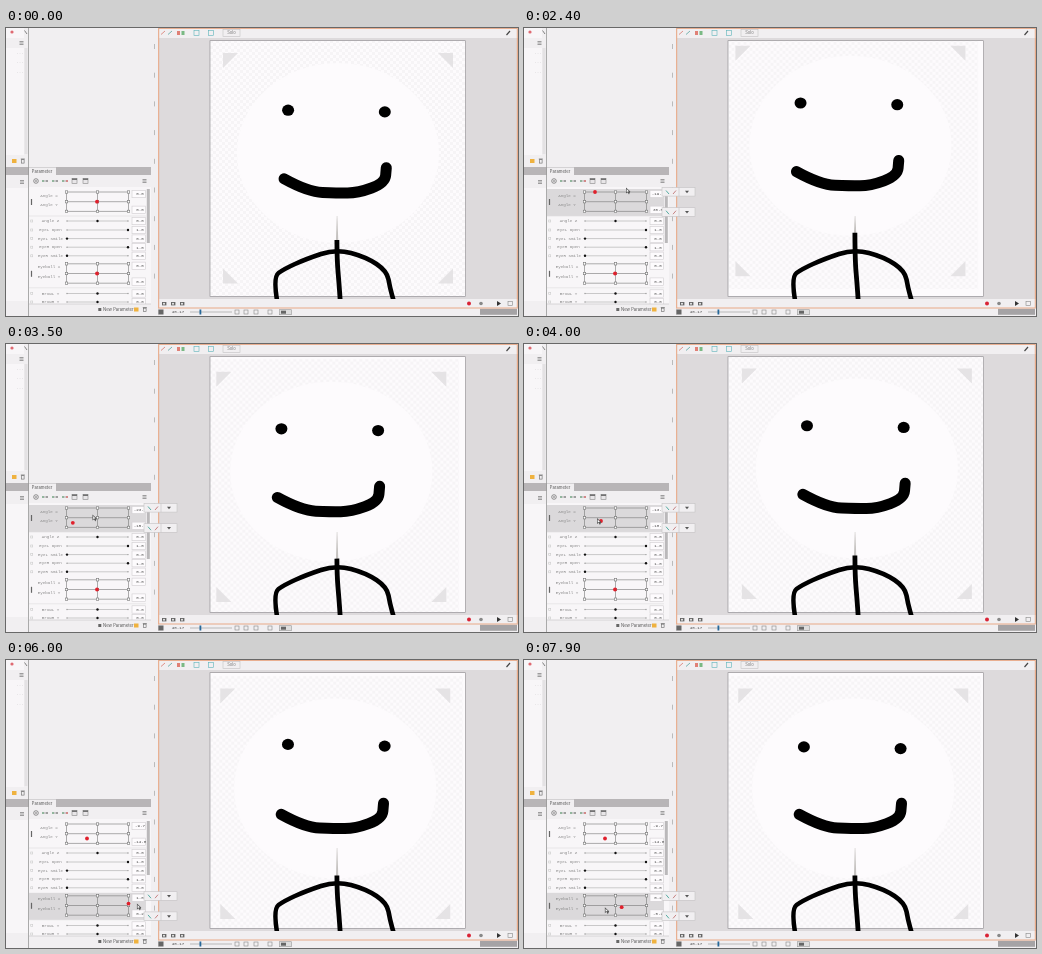
These frames come from a looping animation (512 by 288 pixels, 8 s). An HTML page with a canvas:

```html
<!DOCTYPE html>
<html>
<head>
<meta charset="utf-8">
<style>
html, body { margin: 0; width: 100%; height: 100%; overflow: hidden; background: #dddadc; }
canvas { display: block; }
</style>
</head>
<body>
<canvas id="stage" width="512" height="288"></canvas>
<script>
const c = document.getElementById('stage').getContext('2d');
const LOOP = 8000, GRAB_ANGLE = 1550, GRAB_EYES = 5300;
const MONO = '"Liberation Mono", monospace', SANS = 'Inter, sans-serif';
const PAPER = '#fdfbfd', PANEL = '#f1eff1', EDGE = '#c4c2c4', INK = '#666';
const { sin, cos, PI } = Math;

const clamp = (v, a, b) => Math.min(b, Math.max(a, v));
const ramp = (t, a, b) => { const u = clamp((t - a) / (b - a), 0, 1); return u * u * (3 - 2 * u); };
const mix = (a, b, u) => a.map((v, i) => v + (b[i] - v) * u);

// Key points of the first drag: [ms, x, y]
const dragKeys = [[1500, 91, 173.7], [2400, 71, 164], [3000, 76, 164], [3400, 66, 179], [4000, 77, 177], [5150, 81, 178.5]];
const pointerKeys = [[900, 132, 212], [1400, 95, 174], [2400, 102, 159.5], [3000, 100, 167], [4000, 73, 174], [5150, 81, 178.5]];

function follow(keys, t) {
  return keys.slice(1).reduce((p, k, i) => mix(p, k.slice(1), ramp(t, keys[i][0], k[0])), keys[0].slice(1));
}

// The head follows the pad, with a sway that lags behind the drag
function headAt(t, [x, y]) {
  const u = clamp((t - 2400) / 2200, 0, 1);
  return [(x - 91) / 31 * 8.6 - 4.8 * sin(2 * PI * u), (y - 173.7) / 9.7 * 7.2 - 38 * u ** 4 * (1 - u)];
}

// Sweeping drag across the eyeball pad
function sweep(t, reach, lead) {
  const phase = 2 * PI * (t - 6000) / 1560, gain = ramp(t, GRAB_EYES, 5700);
  return [91 + reach * gain * cos(phase + lead), 245.5 + 6 * gain * sin(2.06 * phase - .34)];
}

function pose(t) {
  const angle = follow(dragKeys, t);
  const [x, y] = sweep(t, 34, 0);
  return {
    angle, head: headAt(t, angle), eye: [clamp(x, 60.5, 122.5), y],
    pointer: mix(follow(pointerKeys, t), sweep(t, 44, .43), ramp(t, 5150, 5350))
  };
}

function box(x, y, w, h, fill, stroke) {
  if (fill) { c.fillStyle = fill; c.fillRect(x, y, w, h); }
  if (stroke) { c.strokeStyle = stroke; c.lineWidth = .6; c.strokeRect(x, y, w, h); }
}
function trace(p) {
  c.beginPath();
  for (let i = 0; i < p.length; i += 2) c.lineTo(p[i], p[i + 1]);
}
function line(color, width, ...p) {
  c.strokeStyle = color; c.lineWidth = width;
  trace(p); c.stroke();
}
function poly(fill, ...p) {
  c.fillStyle = fill;
  trace(p); c.closePath(); c.fill();
}
function dot(x, y, rx, fill, ry = rx) {
  c.fillStyle = fill;
  c.beginPath(); c.ellipse(x, y, rx, ry, 0, 0, 7); c.fill();
}
// Smooth stroke through points
function brush(width, ...p) {
  c.lineWidth = width; c.strokeStyle = '#000';
  c.beginPath(); c.moveTo(p[0], p[1]);
  let i = 2;
  for (; i < p.length - 2; i += 2) c.quadraticCurveTo(p[i], p[i + 1], (p[i] + p[i + 2]) / 2, (p[i + 1] + p[i + 3]) / 2);
  c.lineTo(p[i], p[i + 1]); c.stroke();
}
function text(s, x, y, color = '#888', font = MONO, align = 'center') {
  c.font = '4.2px ' + font;
  c.textAlign = align; c.textBaseline = 'middle'; c.fillStyle = color;
  c.fillText(s, x, y);
}
function menu(x, y) {
  for (let i = -1; i < 2; i++) line(INK, .6, x - 2, y + i * 1.5, x + 2, y + i * 1.5);
}
function files(x, y) {
  box(x - 2, y - 2, 4.5, 4, '#efb23f');
  box(x + 7.5, y - 1.3, 2.6, 3.4, null, INK);
  line(INK, .7, x + 6.8, y - 2, x + 10.8, y - 2);
}

const tile = document.createElement('canvas');
tile.width = tile.height = 6;
const tc = tile.getContext('2d');
tc.fillStyle = '#f6f4f6';
tc.fillRect(0, 0, 3, 3); tc.fillRect(3, 3, 3, 3);
const checker = c.createPattern(tile, 'repeat');

function sidePanels() {
  box(0, 0, 146, 288, PANEL);
  box(0, 0, 18, 127, '#f8f6f8');
  box(0, 10, 18, 10, PANEL);
  dot(6, 4, 1.6, '#df6a72');
  line(INK, .8, 18.5, 2.5, 21, 6);
  menu(15.5, 15);
  for (const y of [25, 34, 44]) text('...', 14, y, '#bbb');
  box(18.5, 20, 3, 106, '#e4e2e4');
  files(8, 133);
  box(0, 139, 145, 8, '#b8b5b7');
  menu(16, 154);
  box(0, 160, 22, 113, '#f8f6f8');
  line('#999', .8, 22.5, 0, 22.5, 288);
}

function value(s, y) {
  box(126, y - 3.7, 13.5, 7.4, '#fdfbfd', '#d0ced0');
  text(s, 134, y + .2, '#444');
}

function popups(y) {
  for (const top of [y, y + 20.2]) {
    box(138, top, 33, 8.6, PANEL, EDGE);
    line('#45a59a', .9, 142, top + 3, 145, top + 6.5);
    line('#b66', .8, 149, top + 6.5, 152, top + 3);
    line(EDGE, .6, 155, top, 155, top + 8.6);
    poly('#555', 161, top + 3.3, 165, top + 3.3, 163, top + 5.8);
  }
}

// Two-axis parameter pad whose top edge is y
function pad(name, y, [px, py], range, active) {
  if (active) box(23, y - 3, 117, 27, '#dbd9db');
  line('#dddbdd', .6, 23, y + 24, 140, y + 24);
  text(name + ' X', 43, y + 3.5);
  text(name + ' Y', 43, y + 13.3);
  line(INK, 1.2, 25.5, y + 7, 25.5, y + 13);
  for (let i = 0; i < 3; i++) {
    line('#777', .6, 60.5 + 31 * i, y, 60.5 + 31 * i, y + 19.4);
    line('#777', .6, 60.5, y + 9.7 * i, 122.5, y + 9.7 * i);
  }
  for (let i = 0; i < 9; i++)
    box(59.3 + 31 * (i % 3), y - 1.2 + 9.7 * Math.floor(i / 3), 2.4, 2.4, '#fff', '#777');
  dot(px, py, 1.9, '#e0202c');
  value(((px - 91) / 31 * range).toFixed(1), y + 2);
  value(((y + 9.7 - py) / 9.7 * range).toFixed(1), y + 17.8);
}

function slider(name, y, pos) {
  box(24.7, y - 1, 2, 2, null, '#ccc');
  line('#aaa', .6, 61, y, 122, y);
  dot(61, y, .7, '#999'); dot(122, y, .7, '#999');
  dot(61 + 61 * pos, y, 1.2, '#111');
  text(name, 44.5, y);
  value(pos === 1 ? '1.0' : '0.0', y);
}

function parameters(t, { angle, eye }) {
  box(23, 139.5, 27, 8, PANEL);
  text('Parameter', 36, 143.4, '#555', SANS);
  c.strokeStyle = INK; c.lineWidth = .7;
  c.beginPath(); c.arc(30, 153, 2.3, 0, 7); c.stroke();
  dot(30, 153, .8, INK);
  for (const x of [39, 49, 59]) {
    line('#777', .6, x - 3, 153, x + 3, 153);
    dot(x - 2, 153, .8, '#4a9b62'); dot(x + 2, 153, .8, x > 55 ? '#d33' : INK);
  }
  for (const x of [66, 77]) { box(x, 150.5, 5, 5, '#e8e6e8', '#888'); box(x, 150.5, 5, 1.4, INK); }
  menu(138.5, 153);
  box(23, 159, 122, 117, '#f8f6f8');
  box(140.8, 161, 3, 54, '#bab8ba');
  const anglesOn = t >= GRAB_ANGLE && t < 5200, eyesOn = t >= GRAB_EYES;
  pad('Angle', 164, angle, 30, anglesOn);
  pad('Eyeball', 235.8, eye, 1, eyesOn);
  slider('Angle Z', 193, .5);
  ['EyeL Open', 'EyeL Smile', 'EyeR Open', 'EyeR Smile'].forEach((s, i) => slider(s, 202 + 8.6 * i, 1 - i % 2));
  slider('BrowL Y', 265.5, .5);
  slider('BrowR Y', 274, .5);
  box(23, 276, 122, 12, PANEL);
  line(EDGE, .6, 23, 276, 145, 276);
  box(92.3, 280, 3, 3, INK);
  text('New Parameter', 97, 281.8, '#555', SANS, 'left');
  files(130, 281.5);
  if (anglesOn) popups(159.5);
  if (eyesOn) popups(231.7);
}

function viewFrame() {
  box(145, 0, 7.5, 288, PANEL);
  line(EDGE, .8, 145.2, 0, 145.2, 288);
  for (let y = 18; y < 275; y += 28.7) line('#bbb', 1, 148.5, y - 2, 148.5, y + 3);
  box(153, 0, 359, 10, PANEL);
  line('#d8786c', .8, 155, 6.5, 159, 3);
  line('#57a5a0', .8, 162, 6.5, 166, 3);
  box(171, 3, 3, 4, '#e08076'); box(175.5, 3, 3, 4, '#7ab984');
  for (const x of [188, 202.5]) box(x, 2.5, 5, 5, null, '#5ab3b9');
  box(217, 1.3, 17, 7, PANEL, EDGE);
  text('Solo', 225.5, 5, '#777', SANS);
  line('#444', 1.2, 500.5, 7, 504, 3);
  box(153, 271, 359, 17, PANEL);
  for (const x of [158, 167, 176]) { box(x - 2, 274, 4.4, 3.4, INK); dot(x, 275.7, 1, '#eee'); }
  dot(463, 275.5, 2, '#d92336');
  dot(475, 275.5, 1.8, '#888');
  poly('#333', 491, 273, 495, 275.5, 491, 278);
  box(502, 273.5, 4.5, 4, null, '#888');
  box(152.5, 281.5, 5, 5, INK);
  text('40.17', 172, 284.2, '#444');
  line('#aaa', .8, 184, 284, 226, 284);
  box(193.5, 281.5, 1.8, 5, '#27689a');
  for (const x of [229, 238, 248, 262]) box(x, 282, 4, 4, null, '#888');
  box(273.5, 281.7, 12, 5, '#ddd', '#999'); box(275, 282.7, 5, 3, INK);
  box(474, 280.8, 37, 6, '#a5a3a5');
  c.strokeStyle = '#e8a987'; c.lineWidth = 1;
  c.strokeRect(152.7, .4, 358.6, 279.6);
}

function drawing([dx, dy], eye) {
  const left = 204, top = 12.7, size = 255.6;
  box(153, 10, 358, 261, '#dddadc');
  box(left, top, size, size, PAPER);
  c.save();
  c.beginPath(); c.rect(left, top, size, size); c.clip();
  c.translate(dx, dy);
  box(left, top, size, size, checker);
  for (const sx of [-1, 1])
    for (const sy of [-1, 1]) {
      const x = 332 + 115 * sx, y = 140.2 + 115.2 * sy;
      poly('#e5e3e5', x, y, x - 15 * sx, y, x, y - 15 * sy);
    }
  dot(332, 125, 101, PAPER, 90);
  c.restore();
  box(left, top, size, size, null, '#88868a');

  c.save();
  c.beginPath(); c.rect(153, 10, 358, 262); c.clip();
  c.lineJoin = 'round';
  poly('#c5c2c0', 330.8, 188, 331.3, 188, 332.3, 213 + dy, 329.9, 213 + dy);
  brush(4.8, 330.9, 212 + dy, 331, 232, 333, 255, 334.3, 274);
  c.lineCap = 'round';
  brush(4.6, 271.3, 274, 267, 249, 278, 241, 300, 231, 330, 221, 360, 229, 381, 243, 384, 260, 388, 274);

  c.translate(dx, dy);
  brush(11, 278, 150.8, 302, 164, 331, 165, 352, 165, 379, 155, 380.3, 139.7);
  const ex = (eye[0] - 91) / 31 * 2.6, ey = (eye[1] - 245.5) * .7;
  for (const i of [0, 1]) dot(282.1 + 96.7 * i + ex, 82.2 + 1.7 * i + ey, 6, '#000', 5.6);
  c.restore();
}

function cursor([x, y]) {
  poly('#555', x, y, x, y + 6, x + 1.5, y + 4.7, x + 3, y + 7, x + 4.3, y + 4);
  poly('#fff', x + .7, y + 1.5, x + .7, y + 4.4, x + 2.9, y + 3.8);
}

function draw(t) {
  const p = pose(t);
  drawing(p.head, p.eye);
  viewFrame();
  sidePanels();
  parameters(t, p);
  if (t >= 900) cursor(p.pointer);
}

const start = performance.now();
function frame() {
  draw((performance.now() - start) % LOOP);
  requestAnimationFrame(frame);
}
frame();
</script>
</body>
</html>
```
